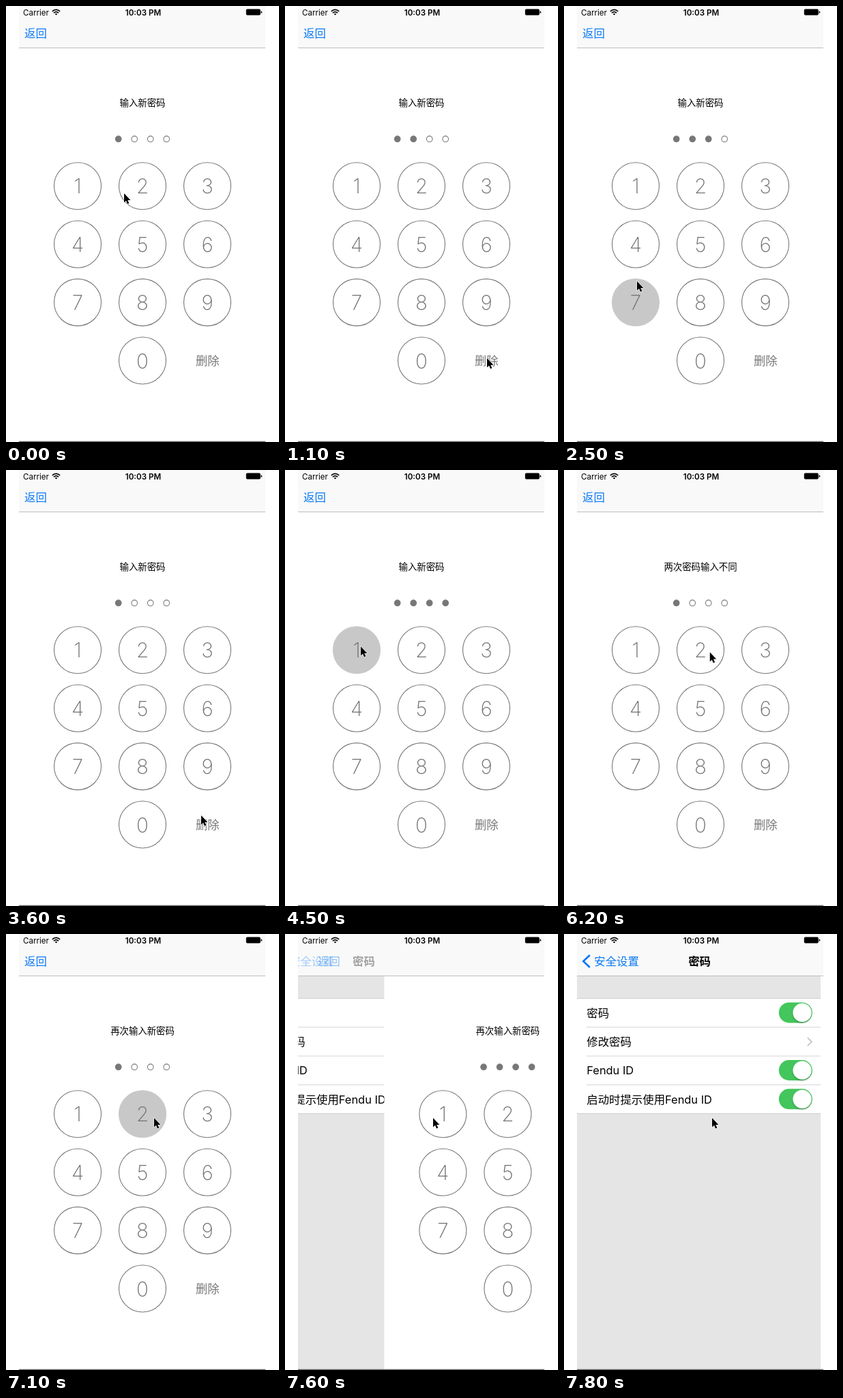
An HTML page that plays this animation: 400 by 640 pixels, repeating every 7.9 s.

```html
<!DOCTYPE html>
<html lang="zh">
<head>
<meta charset="utf-8">
<title>密码</title>
<style>
html, body { margin: 0; width: 100%; height: 100%; overflow: hidden; background: #fff; }
svg { display: block; width: 400px; height: 640px; }
text { font-family: Inter, "Noto Sans CJK SC", "Noto Sans CJK", sans-serif; }
.mid { text-anchor: middle; }
.nav { font-size: 16.4px; fill: #0879f5; }
.row { font-size: 16.4px; fill: #000; }
.digit { font-size: 29.5px; font-weight: 200; fill: #707070; text-anchor: middle; }
.ring { stroke: #777; stroke-width: 1.1; }
</style>
</head>
<body>
<svg viewBox="0 0 400 640">
  <defs>
    <clipPath id="screen"><rect x="19" width="361" height="640"/></clipPath>
    <filter id="soft" x="-30%" y="-30%" width="160%" height="170%">
      <feDropShadow dx="0" dy="1.6" stdDeviation="1.2" flood-opacity=".3"/>
    </filter>
  </defs>
  <rect width="400" height="640" fill="#fff"/>
  <g clip-path="url(#screen)">
    <g id="settings">
      <rect x="-100" y="61" width="480" height="579" fill="#e5e5e5"/>
      <rect x="-100" y="94.5" width="480" height="169" fill="#fff"/>
      <path d="M-100 94.5H380M-100 263.7H380" stroke="#cfcfd1"/>
    </g>
    <g id="keypad">
      <rect x="19" y="61" width="361" height="579" fill="#fff"/>
      <text id="prompt" class="mid" x="200" y="147" font-size="13.4"></text>
      <g id="dots"></g>
      <g id="keys"></g>
      <text id="del" class="mid" x="295.2" y="527" font-size="17.3" fill="#777">删除</text>
    </g>
    <rect x="19" width="361" height="61" fill="#f9f9f9"/>
    <path d="M19 61.5H380" stroke="#bdbdbd"/>
    <text id="back" class="nav" x="27" y="46">返回</text>
    <g id="parent">
      <path d="M38.5 31L29 40L38.5 49" fill="none" stroke="#0879f5" stroke-width="2.7"/>
      <text class="nav" x="45" y="46">安全设置</text>
    </g>
    <text id="title" class="mid" x="200" y="46" font-size="16.4" font-weight="700">密码</text>
    <text x="25" y="13.5" font-size="11.6">Carrier</text>
    <g fill="none" stroke="#000" stroke-width="1.7">
      <path d="M67.8 7.8Q73.5 3 79.2 7.8M69.9 10.2Q73.5 7.2 77.1 10.2"/>
      <path d="M71.6 11.6Q73.5 10.2 75.4 11.6L73.5 13.6Z" fill="#000" stroke="none"/>
    </g>
    <text class="mid" x="201" y="13.5" font-size="11.6" font-weight="600">10:03 PM</text>
    <rect x="351.8" y="4.6" width="21" height="9" rx="1.8"/>
    <path d="M373.6 7.2Q375.4 7.6 375.4 9.1T373.6 11Z"/>
    <path d="M19 639.3H380" stroke="#666" stroke-width="1.2"/>
  </g>
  <path id="cursor" d="M0 0V13.6L3 10.8L5 15.6L7.3 14.6L5.3 9.9H9.4Z" stroke="#fff" stroke-width="1.1" paint-order="stroke"/>
</svg>
<script>
const LOOP = 7900, STEP = 100, WIDTH = 361;
const $ = id => document.getElementById(id);

function add(parent, tag, attrs, text) {
  const el = document.createElementNS("http://www.w3.org/2000/svg", tag);
  for (const k in attrs) el.setAttribute(k, attrs[k]);
  if (text) el.textContent = text;
  return parent.appendChild(el);
}

const dots = [0, 1, 2, 3].map(i =>
  add($("dots"), "circle", { cx: 164.7 + i * 23.5, cy: 195.2, r: 4.3, stroke: "#777", "stroke-width": 1.1 }));

const keys = {};
[..."1234567890"].forEach((d, i) => {
  const x = d === "0" ? 200 : 105 + (i % 3) * 95;
  const y = 264.3 + Math.floor(i / 3) * 85.4;
  keys[d] = add($("keys"), "circle", { class: "ring", cx: x, cy: y, r: 34.5 });
  add($("keys"), "text", { class: "digit", x, y: y + 11 }, d);
});

["密码", "修改密码", "Fendu ID", "启动时提示使用Fendu ID"].forEach((label, i) => {
  const page = $("settings"), y = 115.6 + i * 42.3;
  add(page, "text", { class: "row", x: 34.5, y: y + 6 }, label);
  if (i < 3) add(page, "path", { d: `M34 ${y + 21.2}H380`, stroke: "#d4d4d6" });
  if (i === 1) {
    add(page, "path", { d: `M358 ${y - 5.8}l6 6l-6 6`, fill: "none", stroke: "#c4c4c8", "stroke-width": 1.8 });
  } else {
    add(page, "rect", { x: 316, y: y - 15.2, width: 49, height: 30, rx: 15, fill: "#43c65b" });
    add(page, "circle", { cx: 350.2, cy: y - .2, r: 13.6, fill: "#fff", filter: "url(#soft)" });
  }
});

// time, x, y of the pointer tip
const PATH = [
  [0, 173, 275], [300, 174, 276], [800, 296, 517], [1300, 296, 517], [1700, 112, 412],
  [2500, 107, 404], [3000, 288, 510], [3500, 286, 508], [3700, 286, 506], [4100, 112, 260],
  [4500, 111, 259], [5000, 118, 263], [5400, 125, 266], [5700, 212, 267], [6600, 215, 268],
  [6700, 215, 268], [7000, 217, 270]
];
// time, pressed key, dots filled afterwards
const TAPS = [
  [0, "", 1], [100, "2", 2], [300, "2", 3], [1000, "del", 2], [1300, "del", 1],
  [2000, "7", 2], [2400, "7", 3], [2500, "7", 3], [3200, "del", 2], [3500, "del", 1],
  [4100, "1", 2], [4300, "1", 3], [4500, "1", 4], [4800, "", 0],
  [5000, "1", 1], [5200, "1", 2], [5400, "1", 3], [5700, "2", 4], [5900, "", 0],
  [6100, "2", 1], [6300, "2", 2], [6400, "2", 3], [6500, "2", 4], [6600, "", 0],
  [7100, "2", 1], [7300, "2", 2], [7400, "2", 3], [7500, "2", 4]
];
const PROMPTS = [
  [0, "输入新密码"], [4800, "再次输入新密码"], [5900, "两次密码输入不同"], [6600, "再次输入新密码"]
];
const POP = [[0, 0], [7600, .35], [7700, .88], [7800, .989]];

const latest = (table, t) => table.filter(row => row[0] <= t).pop();

function pointer(t) {
  const a = latest(PATH, t), b = PATH[PATH.indexOf(a) + 1];
  if (!b) return [a[1], a[2]];
  const u = (t - a[0]) / (b[0] - a[0]), e = u * u * (3 - 2 * u);
  return [a[1] + (b[1] - a[1]) * e, a[2] + (b[2] - a[2]) * e];
}

function shift(id, x, opacity = 1) {
  $(id).setAttribute("transform", `translate(${x} 0)`);
  $(id).setAttribute("opacity", opacity);
}

function render(t) {
  const [at, key, count] = latest(TAPS, t);
  const down = t - at < STEP ? key : "";
  const p = latest(POP, t)[1], rest = 1 - p;

  dots.forEach((d, i) => d.setAttribute("fill", i < count ? "#777" : "#fff"));
  for (const d in keys) {
    keys[d].setAttribute("fill", d === down ? "#c8c8c8" : "#fff");
    keys[d].style.stroke = d === down ? "#c8c8c8" : "";
  }
  $("del").setAttribute("opacity", down === "del" ? .3 : 1);
  $("prompt").textContent = latest(PROMPTS, t)[1];

  shift("keypad", WIDTH * p);
  shift("settings", -WIDTH * .3 * rest);
  shift("back", 60 * p, p ? Math.max(0, 1 - 1.6 * p) : 1);
  shift("parent", -60 * rest, p > .95 ? 1 : p);
  shift("title", -130 * rest, p > .95 ? 1 : p);

  $("cursor").setAttribute("transform", `translate(${pointer(t)})`);
}

const start = performance.now();
function frame() {
  const t = (performance.now() - start) % LOOP;
  render(Math.floor(t / STEP) * STEP);
  requestAnimationFrame(frame);
}
frame();
</script>
</body>
</html>
```
